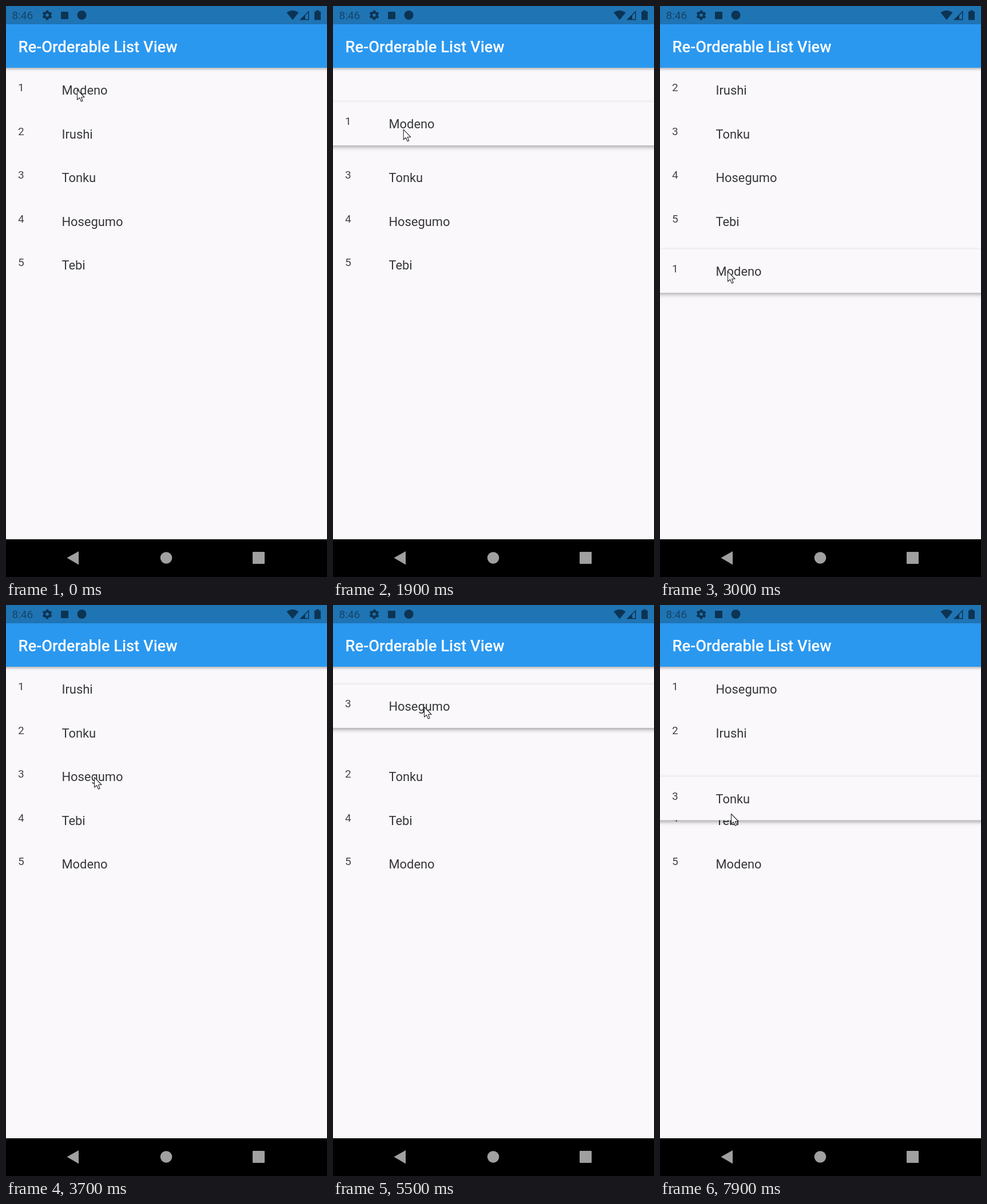
An HTML page for the animation above (8 s loop, 561 by 999 pixels).

```html
<!DOCTYPE html>
<html lang="en">
<head>
<meta charset="utf-8">
<title>Re-Orderable List View</title>
<style>
  html, body { margin: 0; width: 100%; height: 100%; overflow: hidden; background: #faf8fb; }
  svg { display: block; width: 100%; height: 100%; font-family: Roboto, sans-serif; }
  .title { font-size: 27.3px; font-weight: 500; fill: #fff; }
  .clock { font-size: 19.1px; fill: #164567; }
  .name { font-size: 21.86px; fill: #363639; }
  .number { font-size: 19.1px; fill: #444447; }
  .bar { filter: drop-shadow(0 2px 2.5px rgba(0, 0, 0, .32)); }
</style>
</head>
<body>
<svg viewBox="0 0 561 999">
  <rect width="561" height="999" fill="#faf8fb"/>
  <rect class="bar" x="-20" y="-20" width="601" height="128" fill="#2b98f0"/>
  <rect width="561" height="32" fill="#1f74b4"/>
  <text class="title" x="21.5" y="80.7">Re-Orderable List View</text>

  <!-- Status bar -->
  <text class="clock" x="10.5" y="23">8:46</text>
  <g fill="#0c3453">
    <circle cx="72" cy="16" r="4.8" fill="none" stroke="#0c3453" stroke-width="4"/>
    <circle cx="72" cy="16" r="7.3" fill="none" stroke="#0c3453" stroke-width="2.4" stroke-dasharray="4 3.645" stroke-dashoffset="5.8"/>
    <rect x="96" y="10" width="13" height="13" rx="1"/>
    <circle cx="132.5" cy="16" r="8"/>
    <path d="M490.5 11.5Q501 4 511.5 11.5L501 24.5Z"/>
    <path d="M513 24.5L529.5 8V24.5Z"/>
    <path d="M523 16.5L528 11.5V23H523Z" fill="#1f74b4"/>
    <path d="M539 9.5H542V7.5H547V9.5H550V24.5H539Z"/>
  </g>

  <g id="list"></g>

  <!-- Navigation bar -->
  <rect y="933" width="561" height="66"/>
  <g fill="#a0a0a0">
    <path d="M106.5 965.5L127 954V977.5Z"/>
    <circle cx="280" cy="965.5" r="10.3"/>
    <rect x="431" y="955" width="21" height="21" rx="1"/>
  </g>

  <path id="cursor" d="M.5.5V18L4.5 14.5 7.5 21 10 20 7.5 13.5H13Z"
        fill="#fff" stroke="#2a2a2a" stroke-width="1.1" stroke-linejoin="round"/>
</svg>

<script>
const LOOP = 8000, STEP = 100, ROW = 76.5, SLIDE = 250, REACTION = 110;
const names = ['Modeno', 'Irushi', 'Tonku', 'Hosegumo', 'Tebi'];

// A row is lifted, dragged over a distance, then dropped into its new slot.
const drags = [
  { from: 0, to: 4, lift: 1250, start: 1605, time: 1073, distance: 318, drop: 2950 },
  { from: 2, to: 0, lift: 4650, start: 4670, time: 750, distance: -123, drop: 5930 },
  { from: 2, to: 3, lift: 7500, start: 7500, time: 800, distance: 77, drop: Infinity }
];
const pointerStart = { x: 124, y: 146 };
const pointerMoves = [
  { start: 1615, time: 942, x: 118, y: 464 },
  { start: 3150, time: 550, x: 154, y: 301 },
  { start: 4670, time: 660, x: 159, y: 178 },
  { start: 6200, time: 600, x: 124, y: 305 },
  { start: 7500, time: 400, x: 124, y: 365 }
];

const mix = (a, b, k) => a + (b - a) * k;
const smooth = k => k * k * (3 - 2 * k);
const unsmooth = v => 0.5 - Math.sin(Math.asin(1 - 2 * v) / 3);
const ease = (t, start, time) => smooth(Math.min(1, Math.max(0, (t - start) / time)));

// Rows make room shortly after the dragged row covers half of them.
function makeRoom(t, drag, passed) {
  const share = (passed + 0.5) * ROW / Math.abs(drag.distance);
  if (passed < 0 || share > 1) return 0;
  return ease(t, drag.start + drag.time * unsmooth(share) + REACTION, SLIDE);
}

function add(parent, tag, attrs, text = '') {
  const el = document.createElementNS('http://www.w3.org/2000/svg', tag);
  for (const key in attrs) el.setAttribute(key, attrs[key]);
  el.textContent = text;
  return parent.appendChild(el);
}

const list = document.getElementById('list');
const cursor = document.getElementById('cursor');
const rows = names.map(name => {
  const group = add(list, 'g', {});
  const card = add(group, 'rect', { x: -20, y: 109, width: 601, height: 76, fill: '#faf8fb' });
  const number = add(group, 'text', { class: 'number', x: 21, y: 149 });
  add(group, 'text', { class: 'name', x: 97.5, y: 155 }, name);
  return { group, card, number };
});

function drawRows(t) {
  const order = names.map((_, i) => i);
  let active = null;
  for (const drag of drags) {
    if (t < drag.lift) break;
    if (t >= drag.drop + SLIDE) order.splice(drag.to, 0, order.splice(drag.from, 1)[0]);
    else active = drag;
  }

  order.forEach((id, slot) => {
    const { group, card, number } = rows[id];
    let y = slot * ROW, lift = 0;
    if (active) {
      const { from, to, start, time, distance, drop } = active;
      const dir = Math.sign(distance);
      if (slot === from) {
        const settle = ease(t, drop, SLIDE);
        y += mix(distance * ease(t, start, time), (to - from) * ROW, settle);
        lift = ease(t, active.lift, SLIDE) * (1 - settle);
        if (list.lastChild !== group) list.append(group);
      } else {
        y -= dir * ROW * makeRoom(t, active, (slot - from) * dir - 1);
      }
    }
    number.textContent = slot + 1;
    group.setAttribute('transform', `translate(0 ${y})`);
    card.style.display = lift > 0 ? '' : 'none';
    card.style.filter = `drop-shadow(0 3px 3.7px rgba(0, 0, 0, ${0.34 * lift}))`;
  });
}

function drawCursor(t) {
  let { x, y } = pointerStart;
  for (const move of pointerMoves) {
    const k = ease(t, move.start, move.time);
    x = mix(x, move.x, k);
    y = mix(y, move.y, k);
  }
  cursor.setAttribute('transform', `translate(${x} ${y})`);
}

function tick() {
  const t = Math.floor(performance.now() % LOOP / STEP) * STEP;
  drawRows(t);
  drawCursor(t);
  requestAnimationFrame(tick);
}
tick();
</script>
</body>
</html>
```
